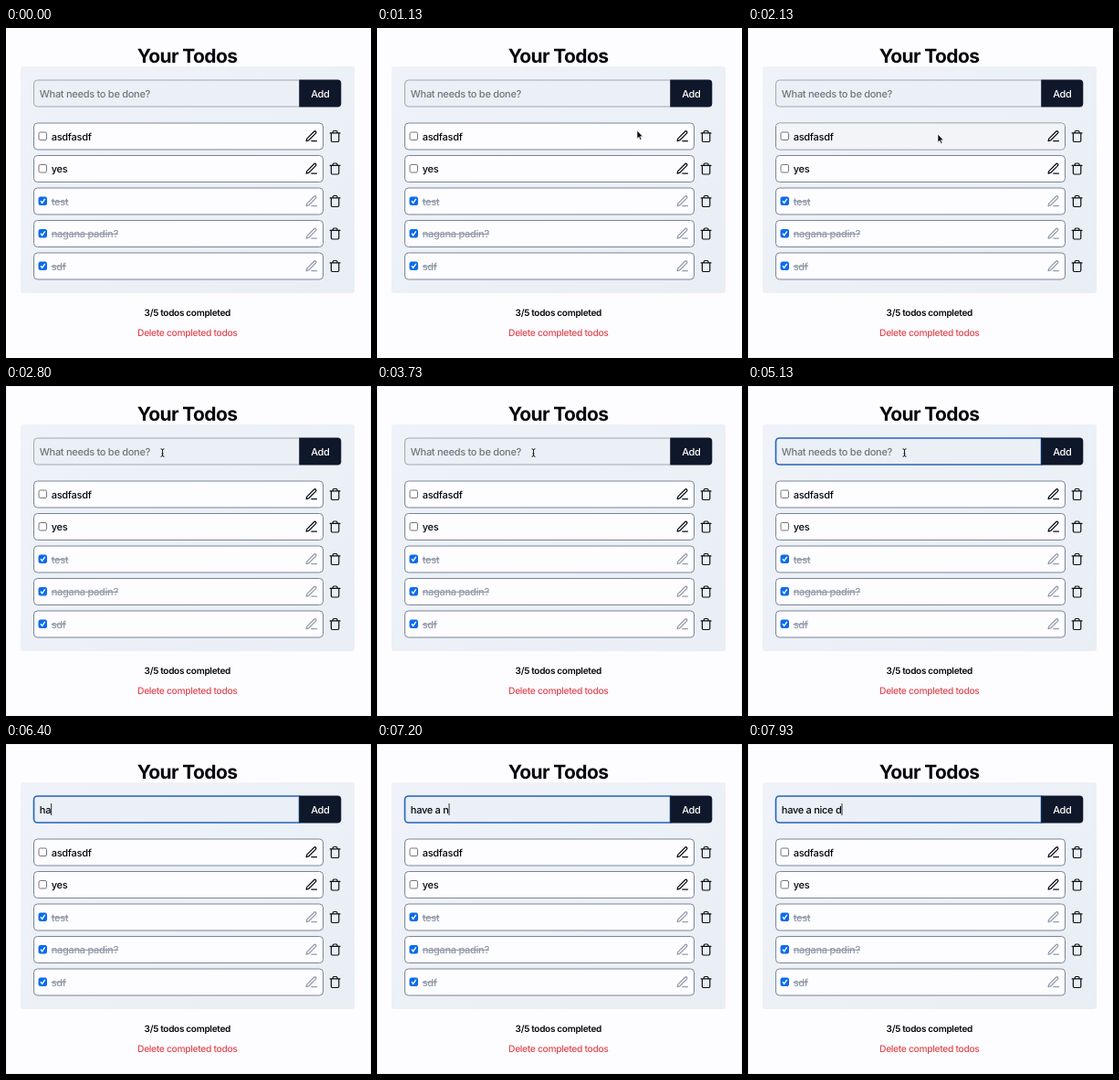
These frames come from a looping animation (400x361 px, 8000 ms). An HTML page:

```html
<!DOCTYPE html>
<html lang="en">
<head>
<meta charset="utf-8">
<title>Your Todos</title>
<style>
  html, body { margin: 0; width: 100%; height: 100%; overflow: hidden; background: #fdfcff; }
  svg { display: block; width: 400px; height: 361px; }
  text {
    font: 450 11px Inter, "Open Sans", sans-serif;
    font-optical-sizing: none;
    text-rendering: geometricPrecision;
    letter-spacing: -.28px;
    white-space: pre;
    fill: #05070c;
  }
  .title { font-size: 21px; font-weight: 700; letter-spacing: -.62px; text-anchor: middle; }
  .add { font-weight: 500; fill: #fff; text-anchor: middle; }
  .count { font-size: 10px; font-weight: 600; letter-spacing: -.29px; text-anchor: middle; }
  .delete { font-size: 10.3px; font-weight: 500; letter-spacing: -.34px; text-anchor: middle; fill: #e0484f; }
  .hint { fill: #70757f; }
  .done text { fill: #8f98a8; text-decoration: line-through; }
  .icon { fill: none; stroke: #0b0f18; stroke-width: 2; stroke-linecap: round; stroke-linejoin: round; }
  .done .pen { stroke: #939cac; }
  .row { fill: #fdfcff; stroke: #7b8597; }
  .box { fill: #fff; stroke: #767676; }
  .done .box { fill: #0b6bee; stroke: #0b6bee; }
  .tick { fill: none; stroke: #fff; stroke-width: 1.4; }
</style>
</head>
<body>
<svg viewBox="0 0 400 361">
  <defs>
    <linearGradient id="shade" x2="1" y2="1">
      <stop stop-color="#eff3f9"/>
      <stop offset="1" stop-color="#e9eef5"/>
    </linearGradient>
    <path id="pen" d="M12 20h9M16.5 3.5a2.12 2.12 0 0 1 3 3L7 19l-4 1 1-4Z"/>
    <path id="bin" d="M3 6h18M19 6v14c0 1-1 2-2 2H7c-1 0-2-1-2-2V6M8 6V4c0-1 1-2 2-2h4c1 0 2 1 2 2v2"/>
  </defs>
  <rect width="400" height="361" fill="#fdfcff"/>
  <rect id="edge" x=".5" y=".5" width="399" height="360" fill="none" stroke="#f1f0f3"/>
  <text class="title" x="198.6" y="37.5">Your Todos</text>
  <rect x="16" y="42" width="366" height="248" rx="3" fill="url(#shade)"/>

  <path id="field" d="M321.5 57H34.5a4 4 0 0 0-4 4v21a4 4 0 0 0 4 4h287z" fill="#ebeff6"/>
  <path d="M321.3 56.5h42a4 4 0 0 1 4 4v22a4 4 0 0 1-4 4h-42z" fill="#0f172a"/>
  <text class="add" x="344.4" y="75.8">Add</text>
  <text id="entry" x="36.8" y="75.8"></text>
  <rect id="caret" y="65" width="1" height="13" fill="#30343c"/>

  <g id="list"></g>

  <text class="count" x="198.8" y="314.6">3/5 todos completed</text>
  <text class="delete" x="198.8" y="336.7">Delete completed todos</text>

  <path id="arrow" d="M0 0V9.2L2.1 7.3 3.5 10.5 5 9.8 3.6 6.7H6.3Z" fill="#000" stroke="#fff" stroke-width=".7"/>
  <path id="beam" d="M-2-4.2Q0-4.2 0-3Q0-4.2 2-4.2M0-3V3M-2 4.2Q0 4.2 0 3Q0 4.2 2 4.2M-1 1H1" fill="none" stroke="#17191e"/>
</svg>
<script>
const LOOP = 8000;
const ENTER = 870, EDGE_ON = 1200, FOCUS = 4600, TYPE_START = 6250, KEY_GAP = 135, BLINK = 500;
const HOVER_IN = 1130, HOVER_OUT = 2335, FADE = 200;
const PHRASE = 'have a nice d';
const HINT = 'What needs to be done?';

const todos = [['asdfasdf'], ['yes'], ['test', true], ['nagana padin?', true], ['sdf', true]];

// time, x, y of the pointer tip
const path = [
  [870, 363, -9], [930, 361, -4], [1130, 285, 112], [1500, 216, 114],
  [1800, 208, 116], [2200, 208, 116], [2600, 171.5, 73], [LOOP, 171.5, 73]
];

const $ = id => document.getElementById(id);
const show = (el, on) => el.style.display = on ? '' : 'none';
const clamp = p => Math.min(1, Math.max(0, p));
const ease = p => p * p * (3 - 2 * p);

$('list').innerHTML = todos.map(([label, done], i) => `
  <g class="${done ? 'done' : ''}" transform="translate(0 ${118.5 + 35.5 * i})">
    <rect class="row" x="30.5" y="-14.5" width="317" height="29" rx="4"/>
    ${i ? '' : '<rect id="hover" x="31" y="-14" width="316" height="28" rx="3.5" fill="#f2f4f8"/>'}
    <rect class="box" x="36" y="-4.5" width="8.5" height="8.5" rx="1.5"/>
    ${done ? '<path class="tick" d="M38-.2 39.7 1.8 42.7-2.6"/>' : ''}
    <text x="49.7" y="4">${label}</text>
    <use class="icon pen" href="#pen" transform="translate(327.2 -7.5) scale(.63)"/>
    <use class="icon" href="#bin" transform="translate(353.4 -7.2) scale(.6)"/>
  </g>`).join('');

function pointerAt(t) {
  const next = path.findIndex(step => step[0] > t);
  if (next < 1) return path[0].slice(1);
  const [t0, x0, y0] = path[next - 1], [t1, x1, y1] = path[next];
  const p = ease((t - t0) / (t1 - t0));
  return [x0 + (x1 - x0) * p, y0 + (y1 - y0) * p];
}

function draw(t) {
  const typing = t >= TYPE_START, focused = t >= FOCUS;
  const typed = typing ? PHRASE.slice(0, 1 + Math.floor((t - TYPE_START) / KEY_GAP)) : '';

  show($('edge'), t >= EDGE_ON);
  $('hover').setAttribute('opacity', clamp((t - HOVER_IN) / FADE) - clamp((t - HOVER_OUT) / FADE));
  $('field').setAttribute('stroke', focused ? '#2463bd' : '#a0a8b5');
  $('field').setAttribute('stroke-width', focused ? 1.6 : 1);

  const entry = $('entry');
  entry.textContent = typed || HINT;
  entry.setAttribute('class', typing ? '' : 'hint');

  show($('caret'), typing || focused && Math.floor((t - FOCUS) / BLINK) % 2 === 0);
  $('caret').setAttribute('x', 36.8 + (typing ? entry.getComputedTextLength() : 0));

  const [x, y] = pointerAt(t);
  const visible = t >= ENTER && !typing, overField = y < 86 && y > 57 && x < 321;
  for (const [id, on] of [['arrow', !overField], ['beam', overField]]) {
    show($(id), visible && on);
    $(id).setAttribute('transform', `translate(${x} ${y})`);
  }
}

const start = performance.now();
function tick() {
  draw((performance.now() - start) % LOOP);
  requestAnimationFrame(tick);
}
tick();
</script>
</body>
</html>
```
